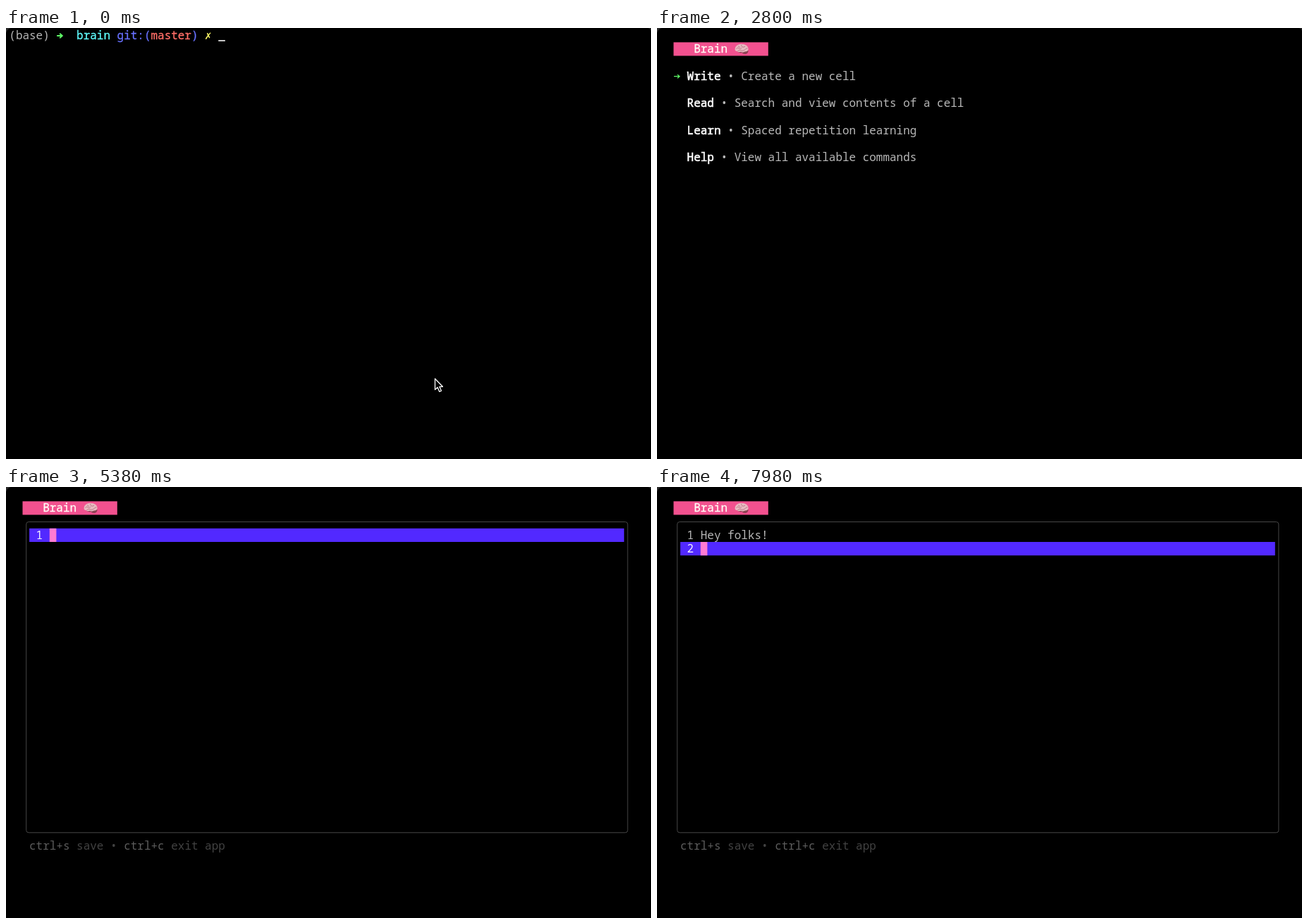
An HTML page for the animation above (8 s loop, 915 by 612 pixels).

```html
<!DOCTYPE html>
<html lang="en">
<head>
<meta charset="utf-8">
<title>Terminal notes</title>
<style>
  html, body { margin: 0; width: 100%; height: 100%; overflow: hidden; background: #000; }
  svg { display: block; width: 915px; height: 612px; }
  text {
    font: 400 16px "Noto Sans Mono", "DejaVu Sans Mono", monospace;
    font-variant-ligatures: none;
    letter-spacing: -.02px;
    white-space: pre;
    color: #b8b8b8;
    fill: currentColor;
  }
  /* a weight between regular and bold */
  .mid, .bold, .title { stroke: currentColor; stroke-width: .3px; }
  .bold { color: #fff; stroke-width: .6px; }
  .title { color: #fffdf5; }
  .key { color: #5c5c5c; }
  .hint { color: #424242; }
  .lit { color: #f2f0ff; }
  .cross { font-family: "DejaVu Sans Mono", monospace; font-weight: 700; }
  .off { display: none; }
</style>
</head>
<body>
<svg viewBox="0 0 915 612">
  <rect width="915" height="612"/>
  <path d="M0 0H7Q2 1 0 7Z" fill="#2b2b2b"/>
  <path d="M915 0h-4q3 1 4 4z" fill="#222"/>

  <g id="shell">
    <path d="M72.2 11h7M76.2 7.8l3.6 3.2-3.6 3.2" fill="none" stroke="#5ff967" stroke-width="1.9"/>
    <rect id="caret" y="17" width="9.6" height="2" fill="#c7c7c7"/>
    <path id="pointer" d="M608.6 498v15.6l3.600-3.300 2.600 6 2.700-1.200-2.600-5.800h4.600z"
      fill="#000" stroke="#fff" stroke-width="1.3" stroke-linejoin="round"/>
  </g>

  <g id="app">
    <rect x="23.5" y="20.3" width="134.3" height="19.2" fill="#f2518f"/>
    <path d="M113 32q4 2 8 1.200l8.500-1.500q.2 4.500-4 5.300-4 .3-5-2-5 1-7.500-3z" fill="#8c4252"/>
    <path d="M110.600 30.500c0-4 3.200-7.500 8.900-7.700 6-.1 9.900 3 10.100 7 .1 2.700-2.200 4-5 3.800-2.200 1.400-4.400 1-5.600.2-2 .8-4.400.4-5.400-.8-1.700.2-3-1-3-2.500z" fill="#e8bac0"/>
    <path d="M112.500 29.500q2-2.500 4-.6t3.800-1M115 26q2 0 2.800 1.800M120 23.800q-1 2 1 3t4-.6M114.500 32.400q3-1.800 5.200-.4t5-1.200 3.600-1.800" fill="none" stroke="#b06a7c" stroke-width=".8"/>
  </g>

  <g id="menu">
    <path d="M24 68.700h8M29 66.100l3 2.600-3 2.600" fill="none" stroke="#5ff967" stroke-width="1.25"/>
  </g>

  <g id="editor">
    <rect x="28.700" y="49.500" width="853.200" height="441.300" rx="3.500" fill="none" stroke="#464646"/>
    <rect id="bar" x="33.100" width="843.700" height="19.200" fill="#5229ff"/>
    <rect id="block" width="9.600" height="19.200" fill="#ff7bd3"/>
  </g>
</svg>
<script>
const LOOP = 8000, CELL = 9.58, ROW = 19.2;
const $ = id => document.getElementById(id);
const colX = c => 4.3 + c * CELL;
const rowY = r => 1.2 + r * ROW;

function put(group, row, col, str, cls = '', color = '') {
  const t = document.createElementNS('http://www.w3.org/2000/svg', 'text');
  t.setAttribute('x', colX(col));
  t.setAttribute('y', rowY(row) + 15);
  t.setAttribute('class', cls);
  t.style.color = color;
  t.textContent = str;
  $(group).append(t);
  return t;
}

put('shell', 0, 0, '(base)');
put('shell', 0, 10, 'brain', 'mid', '#60fdff');
put('shell', 0, 16, 'git:(', 'mid', '#6871ff');
put('shell', 0, 21, 'master', 'mid', '#ff6e67');
put('shell', 0, 27, ')', 'mid', '#6871ff');
put('shell', 0, 29, '✗', 'cross', '#fefb67');
const command = put('shell', 0, 31, '');

put('app', 1, 5, 'Brain', 'title');

[['Write', 'Create a new cell'],
 ['Read', 'Search and view contents of a cell'],
 ['Learn', 'Spaced repetition learning'],
 ['Help', 'View all available commands']].forEach(([name, about], i) => {
  put('menu', 3 + 2 * i, 4, name, 'bold');
  put('menu', 3 + 2 * i, 5 + name.length, '• ' + about);
});

put('editor', 26, 3, 'ctrl+s', 'key');
put('editor', 26, 10, 'save •', 'hint');
put('editor', 26, 17, 'ctrl+c', 'key');
put('editor', 26, 24, 'exit app', 'hint');
const num1 = put('editor', 3, 4, '1');
const line1 = put('editor', 3, 6, '');
const num2 = put('editor', 4, 4, '2', 'lit');

const MENU_AT = 920, EDIT_AT = 4260, ENTER_AT = 7940;
const BLINK = [4700, 5230];
const CMD = { text: 'brain', keys: [20, 100, 190, 270, 350] };
const NOTE = { text: 'Hey folks!', keys: [5540, 5640, 5760, 5900, 6300, 6420, 6600, 6780, 6920, 7120] };

const typed = ({ text, keys }, t) => text.slice(0, keys.filter(k => k <= t).length);
const show = (el, on) => el.classList.toggle('off', !on);

function draw(t) {
  show($('shell'), t < MENU_AT);
  show($('app'), t >= MENU_AT);
  show($('menu'), t >= MENU_AT && t < EDIT_AT);
  show($('editor'), t >= EDIT_AT);

  const cmd = typed(CMD, t);
  command.textContent = cmd;
  $('caret').setAttribute('x', colX(31 + cmd.length));
  show($('pointer'), !cmd);

  const second = t >= ENTER_AT;
  const note = typed(NOTE, t);
  const y = rowY(second ? 4 : 3);
  line1.textContent = note;
  num1.classList.toggle('lit', !second);
  line1.classList.toggle('lit', !second);
  show(num2, second);
  $('bar').setAttribute('y', y);
  $('block').setAttribute('y', y);
  $('block').setAttribute('x', colX(6 + (second ? 0 : note.length)));
  show($('block'), t < BLINK[0] || t >= BLINK[1]);
}

let start;
function tick(now) {
  start ??= now;
  draw((now - start) % LOOP);
  requestAnimationFrame(tick);
}
draw(0);
requestAnimationFrame(tick);
</script>
</body>
</html>
```
